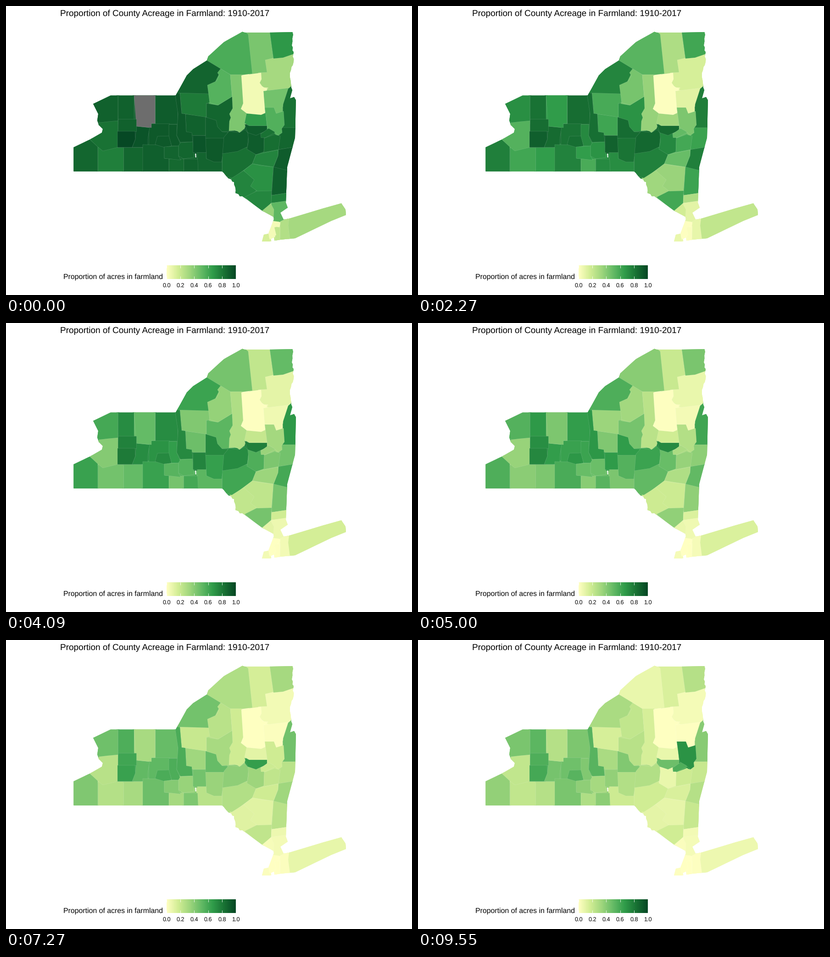
Recreate the animation shown at these times as a matplotlib script. Size 885 by 632 pixels, loop 10000 ms.

```python
import numpy as np
import matplotlib.pyplot as plt
from matplotlib.animation import FuncAnimation
from matplotlib.collections import PolyCollection
from matplotlib.colors import LinearSegmentedColormap
from matplotlib.patches import Polygon

W, H, DPI = 885, 632, 100
LOOP, TICK, SURVEYS = 10000, 50, 22

plt.rcParams["font.family"] = "Liberation Sans"
plt.rcParams["text.hinting"] = "no_hinting"
rng = np.random.default_rng(4)

greens = LinearSegmentedColormap.from_list("greens", [
    "#ffffc2", "#d1ed94", "#9fd67d", "#65bb66", "#309c4a", "#197234", "#064824"])
greens.set_bad("#6d6d6d")

# Shared course of the decline, 0 at the first survey and 1 at the last
decline = np.sin(np.linspace(0, np.pi / 2, SURVEYS))
MID = 9

shapes, shares = [], []


def points(*flat):
    return np.reshape(flat, (-1, 2)).astype(float)


def rough(line, amp, parts=4):
    """Subdivide a line and jitter the new points like a ragged bank."""
    t = np.arange(0, len(line) - 1 + 1e-9, 1 / parts)
    k = np.arange(len(line))
    out = np.column_stack([np.interp(t, k, line[:, i]) for i in (0, 1)])
    jitter = rng.uniform(-amp, amp, out.shape)
    jitter[::parts] = 0
    return out + jitter


def trend(start, mid, end):
    """Decline from start to end, bent to pass through mid."""
    bend = np.log((start - mid) / (start - end)) / np.log(decline[MID])
    return (start + (end - start) * decline ** bend) / 100


def county(levels, *flat, last=None):
    """Four numbers make a box, more make a polygon; later ones lie on top."""
    if len(flat) == 4:
        x0, y0, x1, y1 = flat
        flat = x0, y0, x1, y0, x1, y1, x0, y1
    course = trend(*levels)
    if last is not None:
        course[-1] = last / 100
    shapes.append(points(*flat))
    shares.append(course)


def row(y0, y1, cuts, *levels):
    for x0, x1, level in zip(cuts, cuts[1:], levels):
        county(level, x0, y0, x1, y1)


# State outline, clockwise from the south-west corner
lakes = points(147.5, 361.5, 147.5, 309, 183, 292, 209, 277, 211, 269, 202, 260,
               199, 250, 201, 236, 190, 214, 228, 195.7, 370, 195.7, 394, 152,
               408, 138, 438, 119, 441, 110, 475, 79, 515, 56.5, 520, 58, 575, 58)
champlain = points(624.5, 57, 623, 86, 626, 106, 627, 122, 619, 146, 622, 179)
east = points(624, 184, 619, 202, 628, 199, 632, 206, 630, 288, 613, 352,
              610, 430, 614, 441, 598, 452, 605, 467)
island = points(617, 465, 690, 443, 731, 431.5, 740, 445, 741, 457, 709, 470,
                630, 508, 598, 511, 575, 515, 558, 515, 562, 500, 572, 498,
                584, 466, 583, 461)
delaware = points(559, 448, 521, 420, 500, 409, 497, 385, 482, 374, 471, 361.5)
outline = np.vstack([lakes, rough(champlain, 1.8), east, island, delaware[:1],
                     rough(delaware[1:], 1.8)])

# West
row(309, 363, (200, 256, 298), (78, 46, 22), (88, 50, 26))
county((88, 64, 37), 145, 300, 183, 292, 200, 307, 200, 363, 145, 363)
county((83, 41, 22), 183, 292, 212, 240, 244, 240, 244, 309, 211, 317, 200, 308)
county((90, 60, 44), 185, 190, 244, 190, 244, 251, 222, 253, 205, 255, 190, 250)
row(190, 258, (244, 279, 325, 374), (90, 73, 53), (91, 50, 26), (92, 73, 43))
county((93, 70, 47), 311, 257, 356, 305)
county((95, 73, 45), 284, 263, 313, 266, 309, 291, 309, 304, 298, 309, 275, 309,
       282, 291)
county((91, 50, 26), 279, 190, 325, 190, 325, 257, 317, 257, 317, 266, 284, 263)
shares[-1][0] = np.nan  # not reported in the first survey
county((90, 77, 57), 244, 247, 284, 274)
county((100, 80, 60), 243, 274, 281, 274, 282, 291, 275, 309, 243, 309)
county((91, 64, 44), 298, 303, 345, 304, 345, 333, 355, 334, 355, 363, 298, 363)
county((93, 74, 54), 330, 285, 356, 284, 361, 306, 345, 309, 325, 303)

# Centre
county((93, 66, 56), 355, 259, 373, 259, 372, 283, 382, 306, 361, 306, 355, 284,
       last=42)
county((90, 48, 30), 391, 236, 435, 242, 435, 283, 407, 283, 393, 275)
county((80, 42, 15), 379, 189, 443, 191, 444, 211, 437, 213, 437, 243, 383, 235)
county((93, 74, 54), 369, 196, 371, 189, 379, 189, 383, 235, 391, 236, 393, 275,
       405, 277, 407, 297, 380, 298, 372, 283, 375, 236)
row(334, 363, (355, 387, 419), (87, 45, 28), (90, 60, 39))
county((88, 55, 31), 376, 306, 380, 299, 407, 297, 410, 331, 387, 334, 376, 328)
county((89, 54, 38), 345, 308, 376, 306, 376, 328, 381, 337, 345, 333)
county((89, 53, 18), 417, 320, 437, 320, 437, 334, 471, 341, 471, 363, 419, 363)
county((95, 76, 37), 407, 283, 436, 320)
county((93, 65, 27), 435, 289, 479, 288, 470, 341, 453, 341, 437, 334)
county((88, 53, 25), 493, 198, 500, 273, 470, 275, 437, 243, 437, 213, 462, 217)
county((91, 74, 42), 435, 243, 458, 250, 461, 264, 471, 275, 484, 276, 478, 289,
       435, 289)

# North
county((89, 63, 42), 371, 190, 383, 160, 430, 110, 470, 138, 443, 192, last=30)
county((55, 36, 22), 468, 137, 489, 150, 493, 198, 462, 217, 444, 211, 439, 173,
       459, 164, 465, 152, 461, 146)
county((44, 22, 14), 515, 50, 574, 50, 583, 115, 569, 146, 530, 150)
county((58, 45, 23), 438, 119, 439, 105, 515, 50, 522, 57, 528, 62, 537, 148,
       498, 153, 489, 150, last=8)
county((31, 10, 4), 565, 118, 640, 100, 624, 179, 573, 185, 550, 170, 550, 146,
       569, 145)
county((68, 50, 26), 574, 50, 640, 50, 630, 104, 604, 113, 583, 115)
county((43, 28, 15), 489, 150, 515, 150, 530, 235, 520, 268, 509, 277, 502, 272,
       486, 273, 487, 252, 490, 244, 487, 236, 494, 224, 493, 198)
county((46, 6, 1), 561, 186, 619, 179, 603, 222, 606, 238, 564, 238)
county((83, 68, 40), 615, 181, 622, 175, 640, 203, 632, 267, 601, 267, 604, 215)
county((66, 21, 8), 525, 232, 566, 232, 569, 262, 530, 262, 520, 256)
county((5, 1, .5), 513, 152, 556, 146, 557, 160, 553, 168, 560, 178, 572, 179,
       561, 186, 565, 234, 556, 238, 525, 235, 512, 225, 517, 213)

# East
county((84, 61, 17), 472, 322, 525, 309, 545, 325, 537, 345, 494, 377, 471, 370)
county((92, 73, 27), 475, 287, 486, 274, 509, 277, 521, 270, 529, 280, 526, 308,
       505, 318, 472, 323)
county((92, 57, 28), 527, 276, 556, 279, 563, 289, 562, 319, 545, 325, 525, 313,
       529, 296, last=8)
county((92, 78, 62), 520, 258, 530, 262, 569, 262, 569, 272, 545, 283, 527, 277,
       last=48)
county((88, 46, 20), 602, 266, 633, 266, 632, 308, 594, 314, 594, 283)
county((85, 43, 18), 563, 289, 585, 281, 598, 284, 594, 314, 562, 320)
county((83, 35, 15), 555, 280, 573, 267, 588, 276, 565, 288, 556, 288, last=57)
county((56, 32, 14), 564, 222, 584, 222, 589, 235, 605, 230, 607, 260, 601, 268,
       602, 277, 594, 283, 584, 274, 570, 266, last=70)
county((92, 60, 26), 594, 314, 630, 308, 614, 362, 583, 353, 593, 327)
county((76, 34, 14), 545, 325, 592, 315, 593, 327, 583, 352, 537, 345)

# South
county((76, 22, 10), 491, 377, 518, 360, 545, 380, 545, 405, 520, 422, 490, 415)
county((75, 45, 17), 520, 418, 548, 404, 579, 402, 578, 431, 559, 450)
county((71, 23, 9), 518, 360, 537, 345, 555, 349, 583, 352, 579, 404, 548, 405,
       533, 394, 541, 380)
county((91, 45, 20), 583, 352, 616, 360, 613, 409, 579, 414)
county((77, 17, 5), 579, 414, 613, 409, 612, 427, 578, 431)
county((52, 7, 4), 578, 431, 612, 426, 616, 441, 607, 467, 596, 473, 583, 472)
county((35, 10, 2), 577, 432, 558, 448, 583, 463, 584, 445)
county((31, 16, 7), 616, 460, 735, 428, 745, 460, 619, 514, 614, 480)
county((27, 5, 1), 598, 471, 617, 463, 615, 480, 619, 512, 597, 513)
county((22, 1, 0), 584, 482, 597, 484, 597, 513, 588, 515)
county((15, 5, 1), 555, 495, 572, 495, 576, 517, 555, 517)
county((4, .5, 0), 581, 470, 596, 472, 594, 482, 585, 484, 589, 501, 574, 508,
       572, 495)

shares = np.array(shares)

fig = plt.figure(figsize=(W / DPI, H / DPI), dpi=DPI, facecolor="white")
ax = fig.add_axes([0, 0, 1, 1])

# Colour bar
BAR_X, BAR_W, BAR_TOP, BAR_END = 350, 151, 567, 597
ax.imshow(np.linspace(0, 1, 256)[None], cmap=greens, aspect="auto",
          interpolation="bilinear", extent=(BAR_X, BAR_X + BAR_W, BAR_END, BAR_TOP))
for v in np.linspace(0, 1, 6):
    x = BAR_X + BAR_W * v
    ax.vlines([x, x], [BAR_TOP, BAR_END - 6], [BAR_TOP + 6, BAR_END],
              color="white", lw=0.6)
    ax.text(x, 614.5, f"{v:.1f}", size=9.1, ha="center", va="baseline")

ax.text(117.5, 22, "Proportion of County Acreage in Farmland: 1910-2017",
        size=13.72, va="baseline")
ax.text(125, 597, "Proportion of acres in farmland", size=11.42, va="baseline")

ax.set(xlim=(0, W), ylim=(H, 0))
ax.axis("off")

# The wide-edged layer closes slivers between neighbours
border = Polygon(outline, closed=True, transform=ax.transData)
base = PolyCollection(shapes, linewidths=4, joinstyle="round")
top = PolyCollection(shapes, linewidths=0.4, edgecolors=(1, 1, 1, 0.2),
                     joinstyle="round")
for layer in (base, top):
    ax.add_collection(layer, autolim=False)
    layer.set_clip_path(border)


def draw(i):
    survey = min(int((i + 1) * TICK * SURVEYS / LOOP), SURVEYS - 1)
    colors = greens(shares[:, survey])
    base.set_facecolor(colors)
    base.set_edgecolor(colors)
    top.set_facecolor(colors)
    return base, top


anim = FuncAnimation(fig, draw, frames=LOOP // TICK, interval=TICK,
                     repeat=True, repeat_delay=0, blit=False)
plt.show()
```
